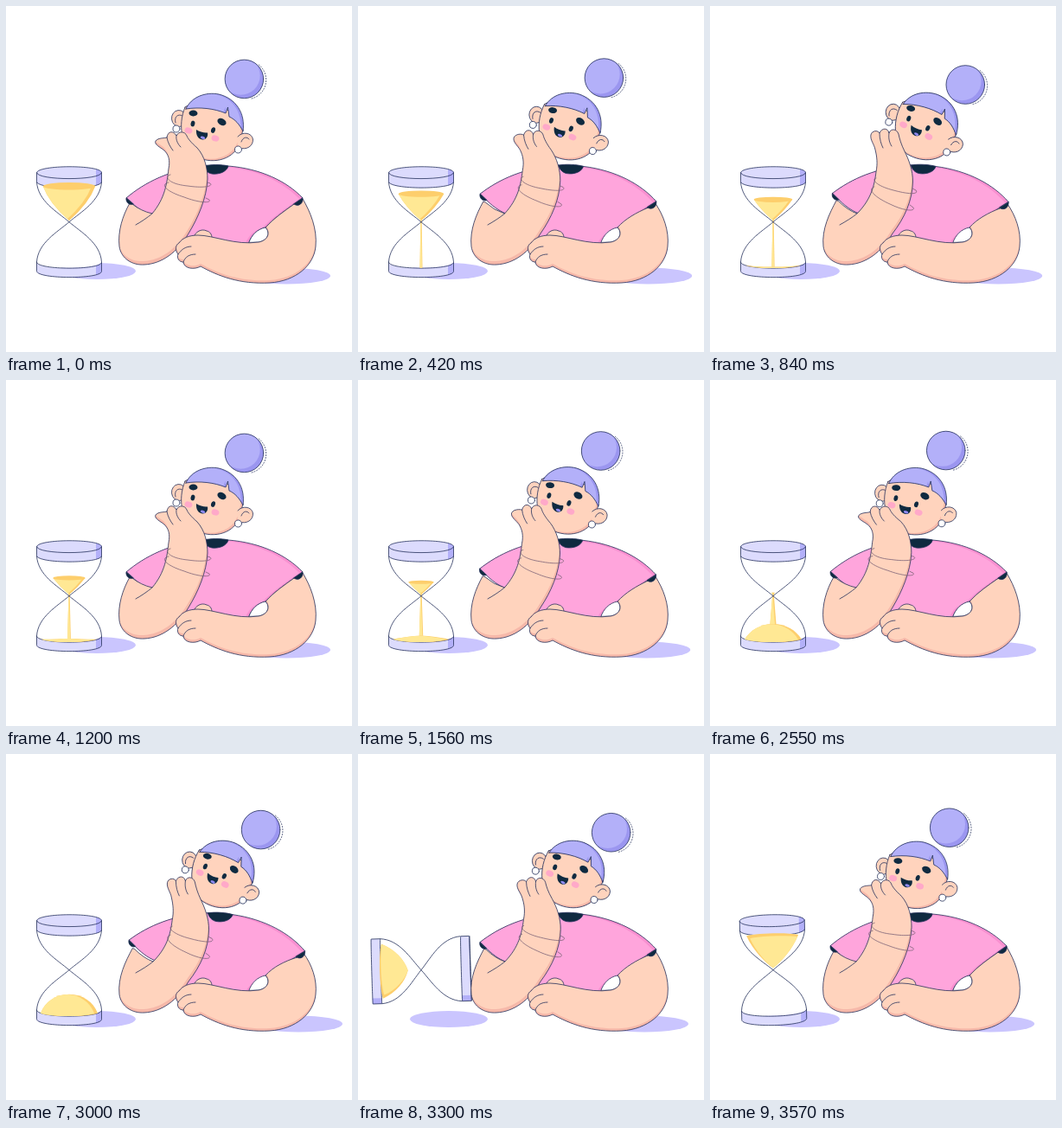
Animation, 400 px wide and 400 px high, one loop 3.6 s. Source, as an HTML page with a canvas:

```html
<!DOCTYPE html>
<html lang="en">
<head>
<meta charset="utf-8">
<title>Waiting</title>
<style>
html, body { margin: 0; height: 100%; overflow: hidden; background: #fff; }
canvas { display: block; width: 400px; height: 400px; }
</style>
</head>
<body>
<canvas id="stage" width="400" height="400"></canvas>
<script>
const ctx = document.getElementById('stage').getContext('2d');
const LOOP = 3600, SWAY = 1200, TAU = Math.PI * 2;
const INK = '#26325c', DARK = '#0f2a40', SKIN = '#ffd3bd', SKIN_SHADE = '#f6b8a9',
  PINK = '#ffa5dc', PINK_SHADE = '#f990d0', HAIR = '#b3b0f9', HAIR_SHADE = '#9b96f0',
  SHADOW = '#cac5fe', CAP = '#dcdbfd', SAND = '#ffe894', SAND_SHADE = '#fdce6c';

const clamp = x => Math.min(1, Math.max(0, x));
const span = (t, a, b) => clamp((t - a) / (b - a));
const ease = x => x * x * (3 - 2 * x);
const wave = (t, delay) => -Math.cos(TAU * (t - delay) / SWAY);

// Blend two paths that share the same commands.
function mix(a, b, k) {
  const target = b.match(/-?[\d.]+/g);
  let i = 0;
  return a.replace(/-?[\d.]+/g, n => (+n + (target[i++] - n) * k).toFixed(2));
}
function draw(d, fill, stroke = INK, width = 0.8) {
  const path = typeof d === 'string' ? new Path2D(d) : d;
  if (fill) { ctx.fillStyle = fill; ctx.fill(path); }
  if (stroke) { ctx.strokeStyle = stroke; ctx.lineWidth = width; ctx.stroke(path); }
}
function oval(x, y, rx, ry = rx, tilt = 0) {
  const path = new Path2D();
  path.ellipse(x, y, rx, ry, tilt, 0, TAU);
  return path;
}
function group(place, paint) {
  ctx.save();
  place();
  paint();
  ctx.restore();
}
// Fill with a shade left along the edge opposite to the shift.
function shaded(d, fill, shade, dx, dy, stroke = INK) {
  const path = typeof d === 'string' ? new Path2D(d) : d;
  draw(path, shade, null);
  group(() => { ctx.clip(path); ctx.translate(dx, dy); }, () => draw(path, fill, null));
  if (stroke) draw(path, null, stroke);
}
function turn(x, y, degrees) {
  ctx.translate(x, y);
  ctx.rotate(degrees * Math.PI / 180);
  ctx.translate(-x, -y);
}

const FLAT = 'M-32,50 C-20,52.5 -8,53 0,53 C8,53 20,52.5 32,50 C20,54.5 -20,54.5 -32,50Z';
const DOME = 'M-33,50 C-28,37 -16,28 0,28 C16,28 28,37 33,50 C20,54.5 -20,54.5 -33,50Z';
const FUNNEL = 'M-30,40 C-22,22 -10,10 0,2 C10,10 22,22 30,40 C18,43 -18,43 -30,40Z';

function cap(side, tilt) {
  const inner = 46.5 * side, outer = 57 * side, sag = 9.3 * tilt, rim = 9.3 * Math.abs(tilt) * side;
  const body = new Path2D(`M-37.5,${inner} C-37.5,${inner + sag} 37.5,${inner + sag} 37.5,${inner}
    L37.5,${outer} C37.5,${outer + rim} -37.5,${outer + rim} -37.5,${outer}Z`);
  draw(body, CAP, null);
  group(() => ctx.clip(body), () => {
    ctx.fillStyle = HAIR;
    ctx.fillRect(tilt < 0 ? -38 : 31, -70, 7, 140);
  });
  draw(body);
  if (side * tilt < 0) draw(`M-37.5,${outer} C-37.5,${outer + sag} 37.5,${outer + sag} 37.5,${outer}`);
}

function hourglass(t) {
  const flip = ease(span(t, 3010, 3600)), tilt = Math.cos(flip * Math.PI), sag = 9.3 * Math.abs(tilt);
  group(() => { ctx.translate(73, 249.7); ctx.rotate(flip * Math.PI); }, () => {
    draw(`M-37,-46 C-36,-24 -14,-12 0,0 C-14,12 -36,24 -37,46 C-37,${46 + sag} 37,${46 + sag} 37,46
      C36,24 14,12 0,0 C14,-12 36,-24 37,-46 C37,${-46 - sag} -37,${-46 - sag} -37,-46Z`, '#fff', null);
    cap(-1, tilt);
    cap(1, tilt);

    const level = -41.5 + 39 * Math.pow(clamp(t / 2650), 0.8), depth = -1.5 - level;
    if (depth > 0.6 && t < 2700) {
      const w = 1.15 * depth - 0.0098 * depth * depth, mid = 0.575 * depth, half = level + depth / 2;
      shaded(`M${-w},${level} Q${-mid},${half} 0,-1.5 Q${mid},${half} ${w},${level}Z`, SAND, SAND_SHADE, -w * 0.14, 0, null);
      draw(oval(0, level, w, w * 0.14), SAND_SHADE, null);
    }

    const pile = Math.pow(span(t, 500, 2800), 1.6), peak = 53 - 24 * pile;
    if (t > 500) {
      const shape = flip ? mix(DOME, FUNNEL, flip) : mix(FLAT, DOME, pile);
      ctx.globalAlpha = span(t, 500, 800);
      shaded(shape, SAND, SAND_SHADE, -4, flip * -3, null);
      ctx.globalAlpha = 1;
    }
    const head = -4 + (peak + 4) * span(t, 80, 420), tail = -4 + (peak + 4) * span(t, 2600, 2850);
    const foot = 1.5 + 2.5 * pile;
    if (head > tail) {
      shaded(`M-.6,${tail} L.6,${tail} L${foot},${head} L${-foot},${head}Z`, SAND, SAND_SHADE, -foot * 0.4, 0, null);
    }

    draw('M-37.5,-46 C-36,-24 -14,-12 0,0 C14,12 36,24 37.5,46 M37.5,-46 C36,-24 14,-12 0,0 C-14,12 -36,24 -37.5,46');
  });
}

function bun(t) {
  const x = 285 + 12.3 * wave(t, 130), y = 86 + 5 * wave(t, 240);
  const rim = new Path2D();
  rim.arc(x + 3, y + 1, 22.3, -0.9, 1.35);
  ctx.setLineDash([1, 2]);
  draw(rim);
  ctx.setLineDash([]);
  shaded(oval(x, y, 22.3), HAIR, HAIR_SHADE, -4, -4);
}

function face() {
  draw(oval(211, 144, 4.5, 3.5, 0.3), '#ffa9c9', null);
  draw(oval(242, 153, 4.5, 3.5, 0.3), '#ffa9c9', null);
  draw(oval(216.5, 124, 5, 3.4, 0.05), DARK, null);
  draw(oval(249.5, 134, 5.4, 3.8, 0.5), DARK, null);
  draw(oval(216, 136, 2.4, 3.4, 0.2), DARK, null);
  draw(oval(239.5, 143.5, 2.4, 3.4, 0.3), DARK, null);
  draw('M220,143 C224,145.5 229,147 233,146.5 C234,151 231,155 227,154.5 C222,154 219.5,149 220,143Z', DARK, null);
  draw(oval(227.5, 152.3, 2.8, 1.5, 0.3), '#8f8af0', null);
}

function head(k) {
  draw(oval(200, 130, 8.5, 9.5, -0.1), SKIN);
  draw('M196,135 C194,128 199,124 204,127');
  draw(oval(197, 142, 4), '#fff');
  group(() => ctx.translate(2 * k, 0), () => {
    shaded('M207,117 C198,138 203,165 221,175 C242,184 264,176 270,159 L274,143 C262,112 225,104 207,117Z',
      SKIN, SKIN_SHADE, -2, -2);
    shaded('M208,119 C214,105 231,99 246,102 C266,107 277,124 274,145 C270,137 265,131 258,128 L256.5,117 L254,124 C241,118.5 224,116.5 208,119Z',
      HAIR, HAIR_SHADE, -3, 0);
  });
  draw('M268,151 C273,145 284,146 285.5,154 C286,162 278,167 269,164 C267,160 267,155 268,151Z', SKIN, null);
  draw('M268,151 C273,145 284,146 285.5,154 C286,162 278,167 270,164 M272,157 C274,151 279,151 281,154');
  draw(oval(268.5, 166, 4), '#fff');
  group(() => ctx.translate(3 * k, -1.5 * k), face);
}

function torso() {
  shaded('M228,185 C190,189 160,204 139,222 L147,229 C157,238 165,242 172,244 L205,275 L230,285 L270,290 L281,273 C284,265 290,259 300,256 C310,245 322,237 333,229 L343,222 C325,203 295,188 257,185Z',
    PINK, PINK_SHADE, -4, 1);
  draw('M228,185 C236,183 250,183 257,185 C255,192 246,195 238,194 C233,193 230,190 228,185Z', DARK);
}
function cuffs() {
  draw('M139,222 C138,226 142,231 147,229Z', DARK);
  draw('M343,222 C344,228 338,233 333,229Z', DARK);
}

const LEFT_ARM = [
  'M143,228 C135,242 129,260 131,278 C133,292 146,300 160,299 C180,298 198,285 211,263 C222,245 232,222 233,200 C233,188 230,174 221,164 C214,158 210,153 209,150 C207,145 200,144 197,150 C194,144 187,144 186,152 C184,153 176,152 173,156 C171,160 178,163 183,167 C188,172 190,178 188,188 C186,205 184,222 169,240 Q156,237 146,229Z',
  'M146,225 C138,240 129,258 131,278 C133,292 146,300 160,299 C180,298 198,285 211,263 C225,245 234,225 234.5,203 C234.5,190 230,178 225,168 C221,160 219,153 218,148 C216,142 209,141 207,147 C206,141 199,140 196,147 C194,143 187,144 186,149 C185,155 190,160 191,166 C193,174 194,182 192,192 C190,208 186,224 170,240 Q159,236 149,226Z'
];
const LEFT_LINES = [
  'M197,150 C196,155 199,160 202,163 M186,152 C187,158 190,163 193,167 M169,240 C163,245 157,249 150,253',
  'M207,147 C206,154 208,159 210,162 M196,147 C196,154 198,160 200,164 M170,240 C164,245 157,249 150,253'
];
const BRACELETS = [
  'M190,195 C182,197 188,206 210,208 C230,211 240,208 236,205 L233,204 M188,204 C178,206 184,214 206,221 C224,228 238,228 235,224 L231,222',
  'M192,199 C186,200 192,208 212,213 C230,218 242,218 238,213 L234,211 M190,209 C182,211 188,220 208,229 C224,237 238,238 235,233 L231,230'
];
const RIGHT_ARM = [
  'M333,229 L343,223 C352,238 360,258 358,278 C356,300 335,318 305,320 C270,322 245,312 225,301 C218,305 206,304 205,296 C200,296 197,291 199,287 C195,282 196,276 200,274 C204,268 212,265 222,265 C240,265 265,277 292,273 C303,271 306,262 300,256 C310,245 322,237 333,229Z',
  'M335,234 L344,229 C353,242 360,260 358,278 C356,300 335,318 305,320 C270,322 245,312 225,301 C218,305 206,304 205,296 C200,296 197,291 199,287 C195,282 196,276 200,274 C204,268 212,265 222,265 C240,265 265,277 292,273 C303,271 306,262 300,256 C309,246 322,239 335,234Z'
];

function render(t) {
  const k = (0.84 + wave(t, 110)) / 1.62, lean = (0.97 + wave(t, 50)) / 1.51;
  const leanTurn = () => {
    ctx.translate(-lean, -1.5 * lean);
    turn(219, 289, 2.8 * lean);
  };
  ctx.fillStyle = '#fff';
  ctx.fillRect(0, 0, 400, 400);

  draw(oval(105, 306.5, 45, 9.5), SHADOW, null);
  draw(oval(331 + 7 * wave(t, 0), 312, 51, 9.5), SHADOW, null);
  hourglass(t);

  group(leanTurn, torso);
  // Daylight between the torso and the bent arm.
  draw('M281,273 C284,265 290,258 300,256 C306,262 303,271 292,273Z', '#fff');
  bun(t);
  group(() => turn(252, 201, 9 * k), () => head(k));

  shaded(mix(...LEFT_ARM, k), SKIN, SKIN_SHADE, -1, -4);
  draw(mix(...LEFT_LINES, k));
  draw(mix(...BRACELETS, k), null, '#7d6478');

  draw('M217,267 C219,261 226,257 232,260 C236,261 238,264 238,268Z', SKIN);
  shaded(mix(...RIGHT_ARM, lean), SKIN, SKIN_SHADE, 0, -3);
  draw('M199,287 C203,281 208,278 214,278 M205,296 C207,290 212,287 219,287');
  group(leanTurn, cuffs);
}

ctx.lineCap = ctx.lineJoin = 'round';
function tick() {
  render(performance.now() % LOOP);
  requestAnimationFrame(tick);
}
tick();
</script>
</body>
</html>
```
